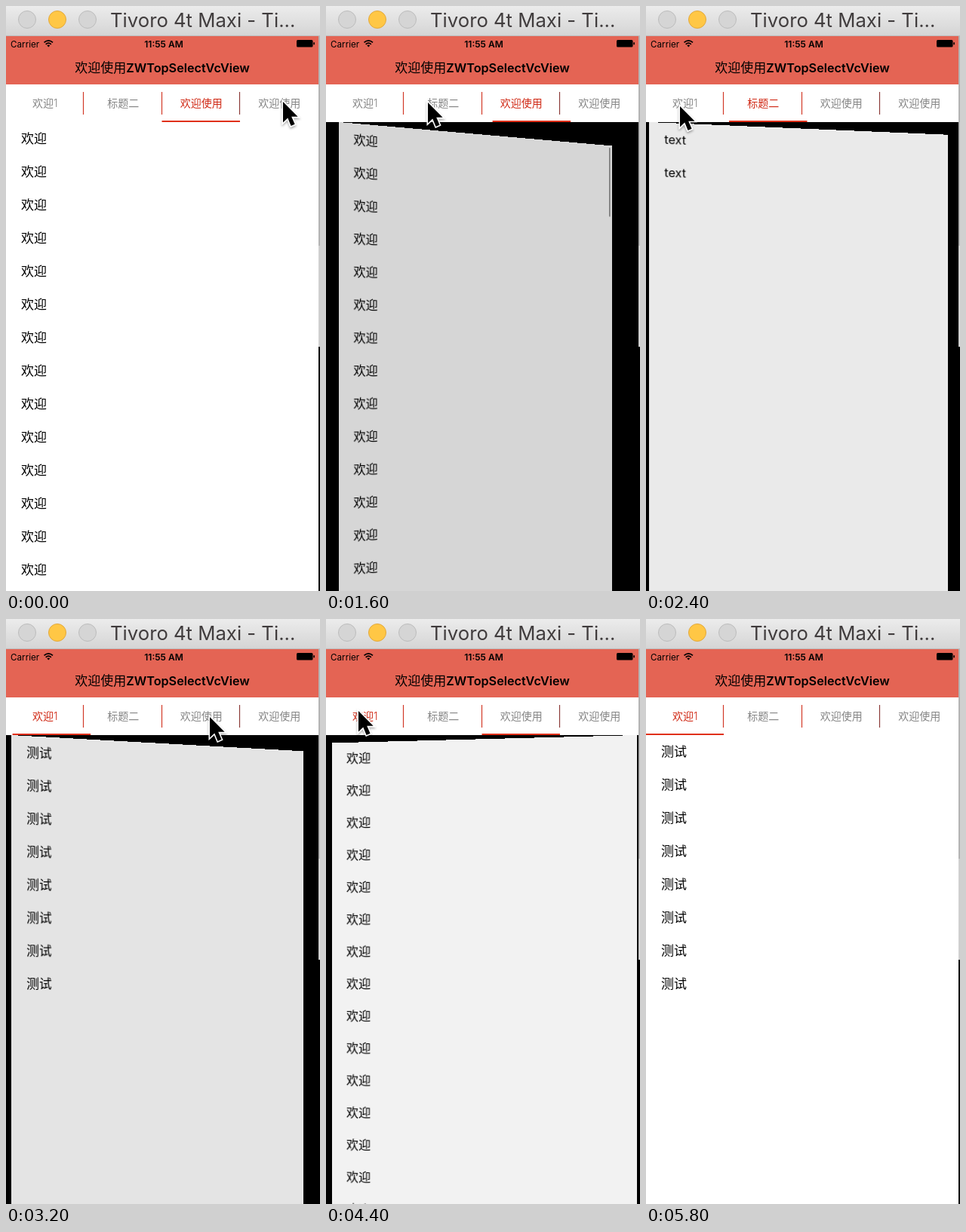
Recreate the animation shown at these times as an HTML page. Size 416x776 px, loop 6 s.

```html
<!DOCTYPE html>
<html lang="zh-CN">
<head>
<meta charset="utf-8">
<title>ZWTopSelectVcView</title>
<style>
  html, body { margin: 0; width: 100%; height: 100%; overflow: hidden; background: #fff; }
  body, svg text { font-family: Inter, "Noto Sans CJK SC", "Noto Sans CJK", sans-serif; }
  #stage { position: absolute; left: 0; top: 0; width: 416px; height: 776px; overflow: hidden; }
  #pages {
    position: absolute; left: 0; top: 154px; width: 414px; height: 622px;
    overflow: hidden; background: #000;
    perspective: 1600px; perspective-origin: 207px 336px;
  }
  .page {
    position: absolute; left: 0; top: 0; width: 414px; height: 672px;
    overflow: hidden; background: #fff; color: #000;
  }
  .row { position: absolute; left: 20px; font-size: 17px; line-height: 44px; white-space: nowrap; }
  .latin { font-size: 16.3px; }
  .shade { position: absolute; inset: 0; background: #000; }
  .bar {
    position: absolute; left: 409px; top: 3px; width: 2.2px; height: 101px;
    border-radius: 2px; background: #777;
  }
  svg { position: absolute; left: 0; top: 0; }
</style>
</head>
<body>
<div id="stage">
  <div id="pages"></div>
  <svg width="416" height="776" viewBox="0 0 416 776">
    <defs>
      <linearGradient id="chrome" x2="0" y2="1">
        <stop offset="0" stop-color="#ececec"/>
        <stop offset="1" stop-color="#d4d4d4"/>
      </linearGradient>
      <filter id="shadow" x="-50%" y="-50%" width="200%" height="200%">
        <feDropShadow dx="0" dy="2" stdDeviation="1.5" flood-opacity=".35"/>
      </filter>
    </defs>

    <rect x="414" y="40" width="2" height="278" fill="#b4b4b4"/>
    <rect x="414" y="318" width="2" height="134" fill="#d0d0d0"/>
    <rect x="414" y="452" width="2" height="324"/>

    <rect width="416" height="40" fill="url(#chrome)"/>
    <rect y="39" width="416" height="1" fill="#bdbdbd"/>
    <g stroke-width="1">
      <circle cx="28" cy="18" r="11.5" fill="#d5d5d5" stroke="#bcbcbc"/>
      <circle cx="68" cy="18" r="11.5" fill="#ffc745" stroke="#e2a83c"/>
      <circle cx="108" cy="18" r="11.5" fill="#d5d5d5" stroke="#bcbcbc"/>
    </g>
    <text x="138" y="28" font-size="25.7" fill="#403c3d">Tivoro 4t Maxi - Ti...</text>

    <rect y="40" width="414" height="64" fill="#e46454"/>
    <text x="6" y="54.5" font-size="11.7">Carrier</text>
    <g fill="none" stroke="#000" stroke-width="1.7">
      <path d="M50.5 48.4Q56.3 43.2 62 48.4M52.7 50.8Q56.3 47.6 59.8 50.8"/>
      <path d="M54.4 52.2Q56.3 50.6 58.2 52.2L56.3 54.4Z" fill="#000" stroke="none"/>
    </g>
    <text x="209" y="54.5" font-size="12" font-weight="600" text-anchor="middle">11:55 AM</text>
    <rect x="385" y="45" width="21.5" height="9.5" rx="1.5"/>
    <rect x="407.3" y="48" width="1.6" height="3.5" rx=".8"/>
    <text x="207" y="88" font-size="17" font-weight="500" text-anchor="middle">欢迎使用<tspan font-size="16.2" font-weight="600">ZWTopSelectVcView</tspan></text>

    <rect y="104" width="414" height="50" fill="#fff"/>
    <g id="tabs" font-size="14" font-weight="300" text-anchor="middle"></g>
    <g stroke-width="1.2">
      <path d="M102.5 114V144M206.5 114V144" stroke="#d23a28"/>
      <path d="M309.5 114V144" stroke="#8c3b38"/>
    </g>
    <rect id="line" y="152" width="103.5" height="2" fill="#e0301a"/>
    <path id="cursor" d="M0 0V27.5L6.3 21.6L10.6 32L15.6 29.8L11.2 19.8H19.6Z"
      stroke="#fff" stroke-width="3" stroke-linejoin="miter" paint-order="stroke" filter="url(#shadow)"/>
  </svg>
</div>
<script>
const LOOP = 6000, STEP = 200, FLIP = 620, TAB = 103.5, FIRST_TAB = 2;
const TAB_NAMES = ['欢迎1', '标题二', '欢迎使用', '欢迎使用'];
const LISTS = [['测试', 8], ['text', 2], ['欢迎', 15]];

// [start time, tab selected]
const MOVES = [[307, 3], [1136, 2], [1891, 1], [2706, 0], [3506, 2], [4313, 0]];

// [time, x, y] of the pointer tip
const POINTER = [
  [0, 367, 127], [420, 367, 127], [780, 265, 128], [1200, 265, 128],
  [1560, 135, 128], [1980, 135, 128], [2380, 45, 133], [2760, 45, 133],
  [3180, 270, 130], [3560, 270, 130], [4000, 43, 122], [4800, 43, 122],
  [5300, 120, -60], [LOOP, 120, -60]
];

const byId = id => document.getElementById(id);
const clamp = v => Math.min(1, Math.max(0, v));
const mix = (a, b, k) => a + (b - a) * k;

function addDiv(parent, className, text = '') {
  const div = document.createElement('div');
  div.className = className;
  div.textContent = text;
  return parent.appendChild(div);
}

// cubic-bezier(.42, 0, .58, 1)
function easeInOut(x) {
  let lo = 0, hi = 1;
  for (let i = 0; i < 24; i++) {
    const s = (lo + hi) / 2, r = 1 - s;
    if (1.26 * r * r * s + 1.74 * r * s * s + s ** 3 < x) lo = s; else hi = s;
  }
  return x >= 1 ? 1 : 3 * (1 - lo) * lo * lo + lo ** 3;
}

const pages = TAB_NAMES.map((_, index) => {
  const el = addDiv(byId('pages'), 'page');
  if (LISTS[index]) {
    const [label, count] = LISTS[index];
    const style = label === 'text' ? 'row latin' : 'row';
    for (let i = 0; i < count; i++) addDiv(el, style, label).style.top = i * 44 + 'px';
  } else {
    el.style.background = '#a57436';
    const row = addDiv(el, 'row latin', 'viewcontroller');
    row.style.left = '100px';
    row.style.top = '128px';
  }
  return { el, shade: addDiv(el, 'shade') };
});
const bar = addDiv(pages[2].el, 'bar');

const tabs = TAB_NAMES.map((name, i) => {
  const text = document.createElementNS('http://www.w3.org/2000/svg', 'text');
  text.setAttribute('x', TAB * (i + 0.5));
  text.setAttribute('y', 134);
  text.textContent = name;
  return byId('tabs').appendChild(text);
});

function stateAt(t) {
  let from = FIRST_TAB, to = FIRST_TAB, age = Infinity;
  for (const [start, tab] of MOVES) {
    if (t < start) break;
    from = to;
    to = tab;
    age = t - start;
  }
  return { from, to, age, turn: easeInOut(clamp(age / FLIP)) };
}

function pointerAt(t) {
  const i = POINTER.findIndex(p => p[0] > t);
  const [a, b] = [POINTER[i - 1], POINTER[i]];
  const k = easeInOut(clamp((t - a[0]) / (b[0] - a[0])));
  return [mix(a[1], b[1], k), mix(a[2], b[2], k)];
}

function render(t) {
  const { from, to, age, turn } = stateAt(t);
  const shown = turn < 0.5 ? from : to;
  const angle = Math.sign(to - from) * Math.PI * (turn < 0.5 ? turn : turn - 1);
  const depth = Math.abs(Math.sin(angle));

  pages.forEach(({ el, shade }, i) => {
    el.style.display = i === shown ? 'block' : 'none';
    el.style.transform = depth > 1e-4
      ? `translateZ(${-207 * depth}px) rotateY(${angle}rad)` : 'none';
    shade.style.opacity = 0.4 * depth;
  });
  bar.style.opacity = to === 2 ? clamp((800 - age) / 200) : 0;

  tabs.forEach((text, i) => text.setAttribute('fill', i === to ? '#d02a16' : '#858585'));
  const slide = clamp((turn - 0.04) / 0.96);
  byId('line').setAttribute('x', mix(from, to, slide) * TAB - 0.5);
  byId('cursor').setAttribute('transform', `translate(${pointerAt(t)})`);
}

const begin = performance.now();
function tick(now) {
  const t = Math.max(0, now - begin) % LOOP;
  render(Math.floor(t / STEP) * STEP);
  requestAnimationFrame(tick);
}
render(0);
requestAnimationFrame(tick);
</script>
</body>
</html>
```
